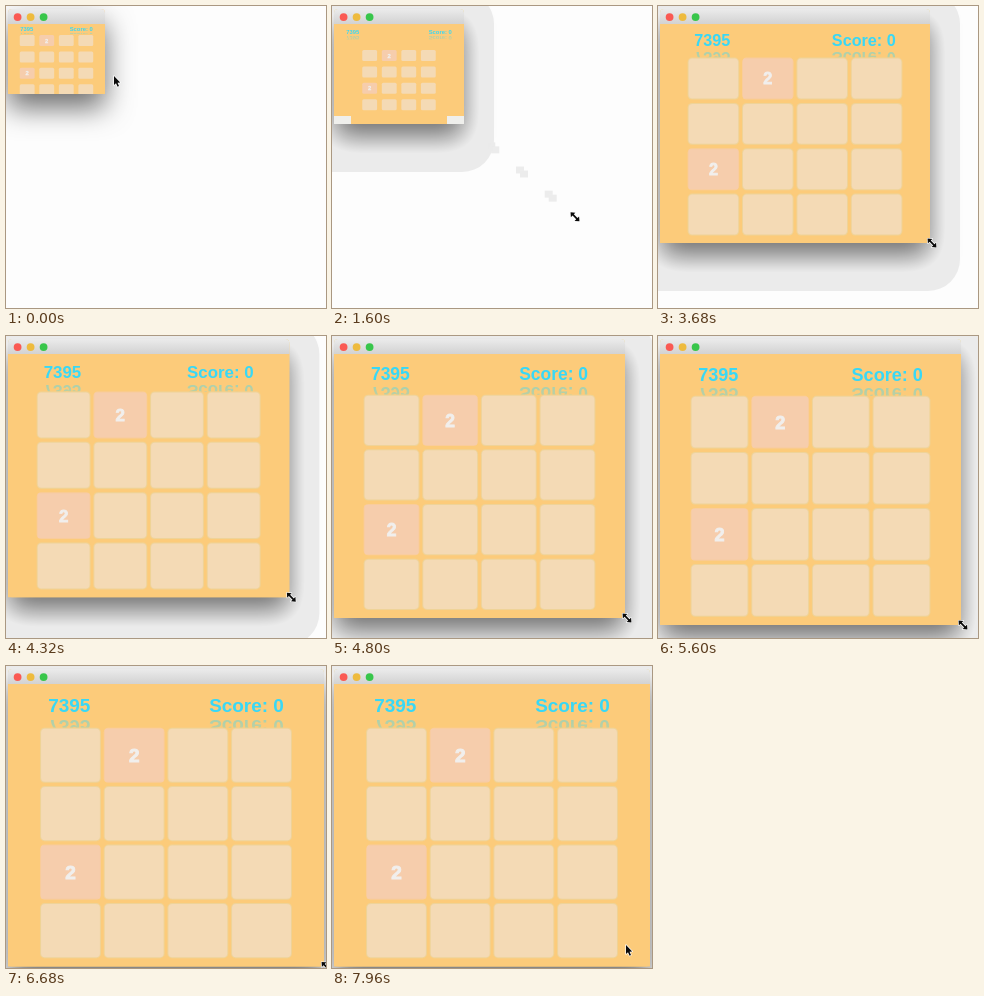
These frames come from a looping animation (320 by 302 pixels, 8 s). An HTML page with a canvas:

```html
<!DOCTYPE html>
<html lang="en">
<head>
<meta charset="utf-8">
<title>Window resize</title>
<style>
html, body { margin: 0; width: 100%; height: 100%; overflow: hidden; background: #fdfdfd; }
canvas { display: block; width: 320px; height: 302px; }
</style>
</head>
<body>
<canvas id="stage" width="320" height="302"></canvas>
<script>
const ctx = document.getElementById('stage').getContext('2d');
const LOOP = 8000, STEP = 40;
const PAPER = '#fdfdfd', SAND = '#fccb7a', SKY = '#38d8f6';
const LEFT = 2, TOP = 3, BAR = 18;
const FIRST_GROWTH = 1440, CATCH_UP = 1760, RELEASE = 7640;

const SMALL = { right: 99, bottom: 88 };
const LAGGED = { right: 132, bottom: 118 };
const DRAG = [
  { t: 3760, right: 272, bottom: 237 },
  { t: 4800, right: 293, bottom: 282 },
  { t: 5600, right: 303, bottom: 289 },
  { t: 6560, right: 318, bottom: 300.5 }
];

const mix = (a, b, k) => a + (b - a) * k;
const progress = (t, from, to) => Math.min(1, Math.max(0, (t - from) / (to - from)));
const ease = k => (1 - Math.cos(Math.PI * k)) / 2;

function windowAt(t) {
  if (t < FIRST_GROWTH) return SMALL;
  if (t < CATCH_UP) return LAGGED;
  return DRAG.slice(1).reduce((now, next, i) => {
    const k = progress(t, DRAG[i].t, next.t);
    return { right: mix(now.right, next.right, k), bottom: mix(now.bottom, next.bottom, k) };
  }, DRAG[0]);
}

function pointerAt(t) {
  if (t < CATCH_UP) {
    const reach = ease(progress(t, 400, 760));
    const pull = ease(progress(t, 1340, 1700));
    return [mix(mix(108, 105, reach), 273, pull), mix(mix(70, 95, reach), 236, pull)];
  }
  const { right, bottom } = windowAt(t);
  const away = ease(progress(t, RELEASE, RELEASE + 160));
  return [mix(right + 2, 294, away), mix(bottom, 279, away)];
}

// Board and header scale with the content area; a stale board is only re-centred.
function layout(win, stale) {
  const base = stale ? SMALL : win;
  const w = base.right - LEFT, h = base.bottom - BAR;
  const px = w * 0.2015, py = Math.max(h * 0.207, 16.4);
  const gap = Math.min(4.8, px * 0.24);
  const margin = w * 0.127;
  return {
    px, py, w: px - gap, h: py - Math.min(5.4, py * 0.33),
    x: LEFT + (win.right - LEFT - 4 * px + gap) / 2,
    y: BAR + h * 0.158 + (win.bottom - base.bottom) / 2,
    titleX: LEFT + margin,
    scoreX: win.right - margin,
    baseline: BAR + (win.bottom - BAR) * 0.1,
    size: w * 0.06
  };
}

function box(x, y, w, h, r, fill) {
  ctx.beginPath();
  ctx.roundRect(x, y, w, h, r);
  ctx.fillStyle = fill;
  ctx.fill();
}

function ramp(y0, y1, from, to) {
  const g = ctx.createLinearGradient(0, y0, 0, y1);
  g.addColorStop(0, from);
  g.addColorStop(1, to);
  return g;
}

function drawShadow({ right, bottom }, halo) {
  ctx.save();
  ctx.shadowColor = 'rgba(0,0,0,.56)';
  ctx.shadowBlur = 28;
  ctx.shadowOffsetY = 14;
  box(LEFT, TOP, right - LEFT, bottom - TOP, 4, SAND);
  ctx.restore();
  if (!halo) return;
  ctx.save();
  ctx.globalCompositeOperation = 'darken';
  box(-50, -14, right + 80, bottom + 62, 32, '#ebebeb');
  ctx.restore();
}

function drawFrame({ right, bottom }) {
  box(LEFT, BAR, right - LEFT, bottom - BAR, 0, SAND);
  box(LEFT, TOP, right - LEFT, BAR - TOP, [4, 4, 0, 0], ramp(TOP, BAR, '#ebebeb', '#d2d2d2'));
  ['#fa5a54', '#eebb3e', '#38c64b'].forEach((c, i) => box(7.7 + i * 13, 7.2, 7.8, 7.8, 3.9, c));
}

function label(text, x, baseline, align, tileTop, size) {
  ctx.textAlign = align;
  ctx.fillStyle = SKY;
  ctx.fillText(text, x, baseline);
  // faded mirror image, hidden behind the tile row
  const axis = baseline + size * 0.2;
  ctx.save();
  ctx.beginPath();
  ctx.rect(0, axis, 320, Math.max(0, Math.min(tileTop - axis, size * 0.75)));
  ctx.clip();
  ctx.translate(0, 2 * axis);
  ctx.scale(1, -1);
  ctx.fillStyle = ramp(baseline, baseline - size * 0.75, 'rgba(56,216,246,.42)', 'rgba(56,216,246,.25)');
  ctx.fillText(text, x, baseline);
  ctx.restore();
}

function drawTile(x, y, w, h, filled, size) {
  const big = w > 20;
  if (big) box(x - 1, y - 1, w + 2, h + 2, 4.5, filled ? '#f9cc9c' : '#efd398');
  box(x, y, w, h, filled || !big ? 1.5 : 4, filled ? '#f6cdac' : '#f4dab5');
  if (!filled) return;
  ctx.textAlign = 'center';
  ctx.fillStyle = ctx.strokeStyle = '#f1efed';
  ctx.lineWidth = size * 0.05;
  const base = y + h / 2 + size * 0.36;
  ctx.fillText('2', x + w / 2, base);
  ctx.strokeText('2', x + w / 2, base);
}

function drawContent(win, lagging) {
  const { x, y, px, py, w, h, titleX, scoreX, baseline, size } = layout(win, lagging);
  ctx.save();
  ctx.beginPath();
  ctx.rect(LEFT, BAR, win.right - LEFT, win.bottom - BAR);
  ctx.clip();
  ctx.font = `bold ${size}px "Liberation Sans", Arial, sans-serif`;
  label('7395', titleX, baseline, 'left', y - 1, size);
  label('Score: 0', scoreX, baseline, 'right', y - 1, size);
  for (let i = 0; i < 16; i++) {
    drawTile(x + (i % 4) * px, y + Math.floor(i / 4) * py, w, h, i === 1 || i === 8, size);
  }
  if (lagging) {
    [LEFT, win.right - 17].forEach(left => box(left, win.bottom - 8, 17, 8, 0, '#efefec'));
  }
  ctx.restore();
}

function drawGhosts(t) {
  for (let past = 1480; past < t && past < 1700; past += STEP) {
    const [x, y] = pointerAt(past);
    box(x - 5, y - 5, 8, 7, 0, '#ececec');
    box(x - 1, y - 1, 8, 7, 0, '#ececec');
  }
}

const ARROW = new Path2D('M0 0V9L2 7.2 3.6 10.7 5 10 3.5 6.7 6.2 6.5Z');
const RESIZE = new Path2D('M6.3 0L2.6-3.2V-.9H-2.6V-3.2L-6.3 0-2.6 3.2V.9H2.6V3.2Z');

function drawPointer(t) {
  const free = t < 760 || t > RELEASE;
  const shape = free ? ARROW : RESIZE;
  ctx.save();
  ctx.translate(...pointerAt(t));
  if (!free) ctx.rotate(Math.PI / 4);
  ctx.lineJoin = 'round';
  ctx.lineWidth = 1.3;
  ctx.strokeStyle = '#fff';
  ctx.stroke(shape);
  ctx.fillStyle = '#0a0a0a';
  ctx.fill(shape);
  ctx.restore();
}

function render(t) {
  const win = windowAt(t);
  const lagging = win === LAGGED;
  ctx.fillStyle = PAPER;
  ctx.fillRect(0, 0, 320, 302);
  if (lagging) drawGhosts(t);
  drawShadow(win, t >= FIRST_GROWTH);
  drawFrame(win);
  drawContent(win, lagging);
  drawPointer(t);
}

const start = performance.now();
function tick() {
  const t = (performance.now() - start) % LOOP;
  render(Math.floor(t / STEP) * STEP);
  requestAnimationFrame(tick);
}
tick();
</script>
</body>
</html>
```
